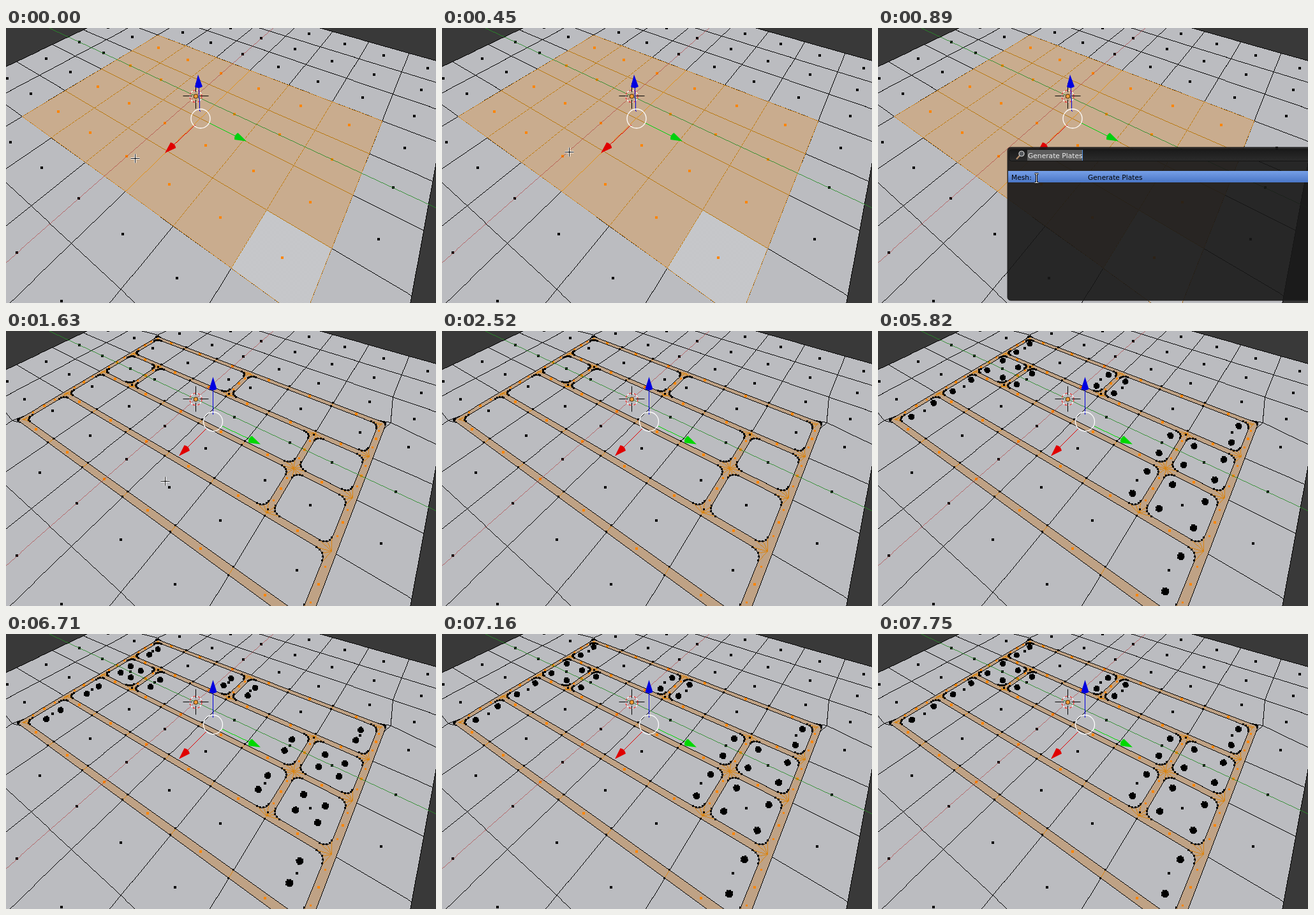
Recreate the animation shown at these times as an HTML page with a canvas. Size 674 px wide and 431 px high, loop 8000 ms.

```html
<!DOCTYPE html>
<html>
<head>
<meta charset="utf-8">
<style>
html, body { margin: 0; width: 100%; height: 100%; overflow: hidden; background: #393939; }
canvas { display: block; }
</style>
</head>
<body>
<canvas id="stage" width="674" height="431"></canvas>
<script>
const c = document.getElementById('stage').getContext('2d');
const LOOP = 8000, GAP = 0.06, ROUND = 0.13, APEX = 0.13;
const ORANGE = '#ff8500', GREY = '#bbbcc0';

// Selected block on the ground: u from U0 to U1, v from V0 to V1
const U0 = -1.5, U1 = 2.5, V0 = -2.5, V1 = 3.5;
// Plates as [near u edge, first v, last v]; every plate is one unit deep in u.
const plates = [
  [1.5, -2.5, 3.5], [0.5, -2.5, 2.5], [0.5, 2.5, 3.5],
  [-0.5, -2.5, -1.5], [-0.5, -1.5, 2.5], [-0.5, 2.5, 3.5],
  [-1.5, -2.5, 0.5], [-1.5, 0.5, 3.5]
];
// [time, distance of the holes from the plate corners]
const insets = [
  [3420, .23], [5820, .242], [5970, .262], [6270, .297], [6410, .342],
  [6560, .355], [6710, .335], [6860, .265], [7010, .243], [7160, .247],
  [7300, .28], [7450, .291], [7600, .28], [7750, .248]
];
// [time, pointer x, y, kind]
const pointer = [
  [0, 202, 204, 'cross'], [300, 200, 199, 'cross'], [450, 199, 194, 'cross'],
  [590, 201, 194, 'cross'], [740, 208, 206, 'beam'], [890, 248, 235, 'beam'],
  [1630, 249, 235, 'cross'], [2080, 237, 235, 'cross'], [2230, 135, 239, 'cross'],
  [2370, 17, 249, 'cross'], [2520, 0, 0, 'none']
];
const stepAt = (list, t) => list.filter(s => s[0] <= t).pop();

// Ground plane to screen, at pixel centres
const depth = (u, v) => 1 - .0931 * u - .065 * v;
function project(u, v) {
  const d = depth(u, v);
  return [(297 - 71.58 * u + 38.05 * v) / d + .5, (106.2 + 28.65 * u + 19.75 * v) / d + .5];
}

function trace(points, closed) {
  points.forEach((p, i) => i ? c.lineTo(...p) : c.moveTo(...p));
  if (closed) c.closePath();
}
function stroke(points, color, width = 1) {
  c.beginPath();
  trace(points);
  c.strokeStyle = color;
  c.lineWidth = width;
  c.stroke();
}
// Hard-edged line one pixel wide, optionally dashed
function line([x0, y0], [x1, y1], color, on = 1, off = 0) {
  const dx = x1 - x0, dy = y1 - y0;
  const n = Math.ceil(Math.max(Math.abs(dx), Math.abs(dy))) || 1;
  c.fillStyle = color;
  for (let i = 0; i < n; i++)
    if (i % (on + off) < on) c.fillRect(Math.floor(x0 + dx * i / n), Math.floor(y0 + dy * i / n), 1, 1);
}
const edge = (u0, v0, u1, v1, ...style) => line(project(u0, v0), project(u1, v1), ...style);
const loop = (points, ...style) =>
  points.forEach((p, i) => line(p, points[(i + 1) % points.length], ...style));
function shape(points, color) {
  c.beginPath();
  trace(points, true);
  c.fillStyle = color;
  c.fill();
}
const quad = (u0, v0, u1, v1) =>
  [project(u0, v0), project(u0, v1), project(u1, v1), project(u1, v0)];
function square([x, y], size, color) {
  c.fillStyle = color;
  c.fillRect(Math.floor(x - size / 2), Math.floor(y - size / 2), size, size);
}
function ring(x, y, r, color, width, dash = []) {
  c.beginPath();
  c.arc(x, y, r, 0, 7);
  c.strokeStyle = color;
  c.lineWidth = width;
  c.setLineDash(dash);
  c.stroke();
  c.setLineDash([]);
}

const stipple = (() => {
  const tile = document.createElement('canvas');
  tile.width = tile.height = 2;
  const t = tile.getContext('2d');
  t.fillStyle = GREY;
  t.fillRect(0, 0, 2, 2);
  t.fillStyle = '#d0d1d3';
  t.fillRect(0, 0, 1, 1);
  t.fillRect(1, 1, 1, 1);
  return c.createPattern(tile, 'repeat');
})();

const inBlock = (u, v) => u >= U0 && u <= U1 && v >= V0 && v <= V1;
const isCorner = (u, v) => (u == U0 || u == U1) && (v == V0 || v == V1);

// Once split, grid lines from outside meet the block corners at a pushed-out point
function gridEdge(u0, v0, u1, v1, split) {
  const node = (u, v, u2, v2) => split && isCorner(u, v) && !inBlock(u2, v2)
    ? project(u + Math.sign(u) * APEX, v + Math.sign(v) * APEX) : project(u, v);
  line(node(u0, v0, u1, v1), node(u1, v1, u0, v0), '#000');
}

function drawGrid(split) {
  c.fillStyle = '#393939';
  c.fillRect(0, 0, 674, 431);
  shape(quad(-4.5, -4.5, 4.5, 4.5), GREY);
  for (let i = -4.5; i < 5; i++) for (let j = -4.5; j < 4; j++) {
    gridEdge(i, j, i, j + 1, split);
    gridEdge(j, i, j + 1, i, split);
  }
}

function drawOuterDots(split) {
  // outside cells give way to the strips and lean towards the block corners
  const lean = (x, low, high) => x == low + .5 ? -.13 : x == high - .5 ? .13 : 0;
  for (let u = -4; u < 5; u++) for (let v = -4; v < 5; v++) {
    if (inBlock(u, v)) continue;
    let a = u, b = v;
    if (split) {
      const du = inBlock(u - 1, v) - inBlock(u + 1, v);
      const dv = inBlock(u, v - 1) - inBlock(u, v + 1);
      a += du * .04 + (dv ? lean(u, U0, U1) : 0);
      b += dv * .04 + (du ? lean(v, V0, V1) : 0);
    }
    square(project(a, b), 4, '#000');
  }
}

function drawSelection() {
  shape(quad(U0, V0, U1, V1), '#c9ac8e');
  shape(quad(1.5, 2.5, U1, V1), stipple);
  for (let u = -0.5; u < 2; u++) edge(u, V0, u, V1, '#b87a14');
  for (let v = -1.5; v < 3; v++) {
    if (v == .5) edge(U0, v, U1, v, '#e0921c');
    else edge(U0, v, U1, v, '#c07c10', 4, 1);
  }
  loop(quad(U0, V0, U1, V1), '#e08a10', 2, 1);
  for (let u = -1; u < 3; u++) for (let v = -2; v < 4; v++) square(project(u, v), 4, ORANGE);
}

// Outline of a rectangle on the ground with rounded corners, five points each
function rounded(u0, v0, u1, v1, r) {
  const out = [];
  [[u1, v1], [u0, v1], [u0, v0], [u1, v0]].forEach(([u, v], k) => {
    const cu = u + (u == u0 ? r : -r), cv = v + (v == v0 ? r : -r);
    for (let i = 0; i < 5; i++) {
      const a = (k + i / 4) * Math.PI / 2;
      out.push(project(cu + r * Math.cos(a), cv + r * Math.sin(a)));
    }
  });
  return out;
}

function drawPlates() {
  const outer = rounded(U0 - GAP, V0 - GAP, U1 + GAP, V1 + GAP, .04);
  const outlines = plates.map(([u, a, b]) => rounded(u + GAP, a + GAP, u + 1 - GAP, b - GAP, ROUND));

  c.beginPath();
  [outer, ...outlines].forEach(o => trace(o, true));
  c.fillStyle = '#bfa285';
  c.fill('evenodd');

  // spokes at the joints, then seams and face dots along the strips
  plates.forEach(([u, a, b], k) => outlines[k].forEach((p, i) => {
    const q = Math.floor(i / 5);
    if (i % 5 % 2 == 0) line(project(q == 0 || q == 3 ? u + 1 : u, q < 2 ? b : a), p, '#d98412');
  }));
  plates.forEach(([u, a, b]) => {
    for (const s of [u, u + 1]) {
      for (let v = a + .5; v < b; v++) square(project(s, v), 4, ORANGE);
      for (let v = a + 1; v < b; v++) {
        edge(s - GAP, v, s + GAP, v, '#d98412');
        square(project(s - GAP, v), 3, '#000');
        square(project(s + GAP, v), 3, '#000');
      }
    }
    for (const v of [a, b]) {
      square(project(u + .5, v), 4, ORANGE);
      square(project(u + .25, v), 3, ORANGE);
      square(project(u + .75, v), 3, ORANGE);
    }
  });

  [outer, ...outlines].forEach(o => {
    loop(o, '#000');
    o.forEach(p => square(p, 3, '#000'));
  });

  // small outer facets at the corners
  for (const u of [U0, U1]) for (const v of [V0, V1]) {
    const su = Math.sign(u), sv = Math.sign(v);
    const tip = [u + su * APEX, v + sv * APEX];
    edge(u + su * GAP, v - sv * .1, ...tip, '#000');
    edge(u - su * .1, v + sv * GAP, ...tip, '#000');
  }

  plates.forEach(([u, a, b]) => {
    for (let v = a + .5; v < b; v++) {
      const first = v == a + .5, last = v == b - .5;
      square(project(u + .5, v + (last - first) * .21), 4, '#000');
    }
  });
}

function drawHoles(d) {
  const e = d - .012;
  plates.forEach(([u, a, b]) => {
    for (const s of [u + d, u + 1 - d]) for (const v of [a + e, b - e]) {
      const [x, y] = project(s, v), r = 2.4 + 2 / depth(s, v);
      c.fillStyle = '#000';
      c.beginPath();
      c.arc(x, y, r - .2, 0, 7);
      c.fill();
      for (let k = 0; k < 8; k++) {
        const w = k * Math.PI / 4 + .3;
        square([x + (r - 1) * Math.cos(w), y + (r - 1) * Math.sin(w)], 3, '#000');
      }
    }
  });
}

function drawAxes() {
  edge(-9, 0, 4.6, 0, 'rgba(176,50,50,.6)');
  edge(0, -9, 0, 6, 'rgba(40,140,40,.85)');
}

function drawOrigin() {
  ring(297.5, 107, 9.5, '#fff', 1.2);
  ring(297.5, 107, 9.5, '#e02020', 1.2, [4, 4]);
  for (const s of [-1, 1]) {
    stroke([[297.5 + s * 6, 106.5], [297.5 + s * 20, 106.5]], '#000');
    stroke([[297.5, 106.5 + s * 6], [297.5, 106.5 + s * 20]], '#000');
  }
  c.beginPath();
  c.arc(297.5, 107, 3.3, 0, 7);
  c.fillStyle = '#f09a38';
  c.fill();
  ring(297.5, 107, 3.3, '#3a2408', 1);
}

function arrow(from, tip, color, length, half) {
  const dx = tip[0] - from[0], dy = tip[1] - from[1], n = Math.hypot(dx, dy);
  const base = [tip[0] - dx / n * length, tip[1] - dy / n * length];
  const side = [-dy / n * half, dx / n * half];
  line(from, base, color);
  c.beginPath();
  c.moveTo(...tip);
  c.lineTo(base[0] + side[0], base[1] + side[1]);
  c.quadraticCurveTo(base[0] - dx / n * 4, base[1] - dy / n * 4, base[0] - side[0], base[1] - side[1]);
  c.fillStyle = color;
  c.fill();
}

function drawGizmo(split) {
  if (split) {
    arrow([324.5, 130], [324.5, 72], '#0000e0', 19, 6);
    arrow([339, 149], [399, 177.5], '#00d800', 18, 6);
    arrow([314, 153], [271, 196], '#e00000', 18, 6);
  } else {
    arrow([304, 130], [301, 73], '#0000e0', 19, 6);
    arrow([319, 149], [377, 177.5], '#00d010', 18, 6);
    arrow([296, 152], [249, 196], '#e00000', 18, 6);
  }
  ring(split ? 324.5 : 305, 142, 15, '#fff', 1.3);
}

function label(text, x, y, color) {
  c.font = '10.7px "DejaVu Sans", sans-serif';
  c.fillStyle = color;
  c.fillText(text, x, y);
}

function vertical(y0, y1, top, bottom) {
  const g = c.createLinearGradient(0, y0, 0, y1);
  g.addColorStop(0, top);
  g.addColorStop(1, bottom);
  return g;
}

function drawMenu() {
  c.beginPath();
  c.roundRect(203, 187, 490, 240, 5);
  c.fillStyle = 'rgba(25,25,25,.91)';
  c.fill();
  c.strokeStyle = '#222';
  c.lineWidth = 1;
  c.stroke();

  c.beginPath();
  c.roundRect(205.5, 190.5, 490, 18, 4);
  c.fillStyle = vertical(190, 209, '#1a1a1a', '#2c2c2c');
  c.fill();
  c.strokeStyle = '#141414';
  c.stroke();
  stroke([[222, 200], [217, 205.5]], '#b08a68', 2.4);
  c.beginPath();
  c.arc(225, 197, 4, 0, 7);
  c.fillStyle = '#55585c';
  c.fill();
  ring(225, 197, 4, '#ddd', 1.2);
  c.fillStyle = '#5c5c5c';
  c.fillRect(234, 191, 86, 17);
  c.fillStyle = '#4f8fe0';
  c.fillRect(320, 191, 1, 17);
  label('Generate Plates', 235, 204, '#eee');

  c.fillStyle = vertical(224, 242, '#76a0e8', '#4a76c6');
  c.fillRect(204, 224, 470, 18);
  label('Mesh:', 209, 238, '#000');
  label('Generate Plates', 329, 238, '#000');
}

function drawPointer([, x, y, kind]) {
  if (kind == 'none') return;
  x += .5;
  y += .5;
  const lines = kind == 'cross'
    ? [[[x - 7, y], [x + 7, y]], [[x, y - 7], [x, y + 7]]]
    : [[[x, y - 7], [x, y + 7]], [[x - 3, y - 7], [x + 3, y - 7]], [[x - 3, y + 7], [x + 3, y + 7]]];
  const [back, front] = kind == 'cross' ? ['#fff', '#000'] : ['#000', '#fff'];
  lines.forEach(l => stroke(l, back, 3));
  lines.forEach(l => stroke(l, front, 1));
}

let shown;
function draw(t) {
  const split = t >= 1630, hole = stepAt(insets, t), hand = stepAt(pointer, t);
  // everything moves in steps, so repaint only when a step is reached
  const step = Math.max(hand[0], hole ? hole[0] : 0);
  if (step === shown) return;
  shown = step;

  drawGrid(split);
  if (split) drawPlates();
  else drawSelection();
  drawOuterDots(split);
  if (hole) drawHoles(hole[1]);
  drawAxes();
  drawOrigin();
  drawGizmo(split);
  if (t >= 590 && !split) drawMenu();
  drawPointer(hand);
}

const start = performance.now();
function tick() {
  draw((performance.now() - start) % LOOP);
  requestAnimationFrame(tick);
}
tick();
</script>
</body>
</html>
```
